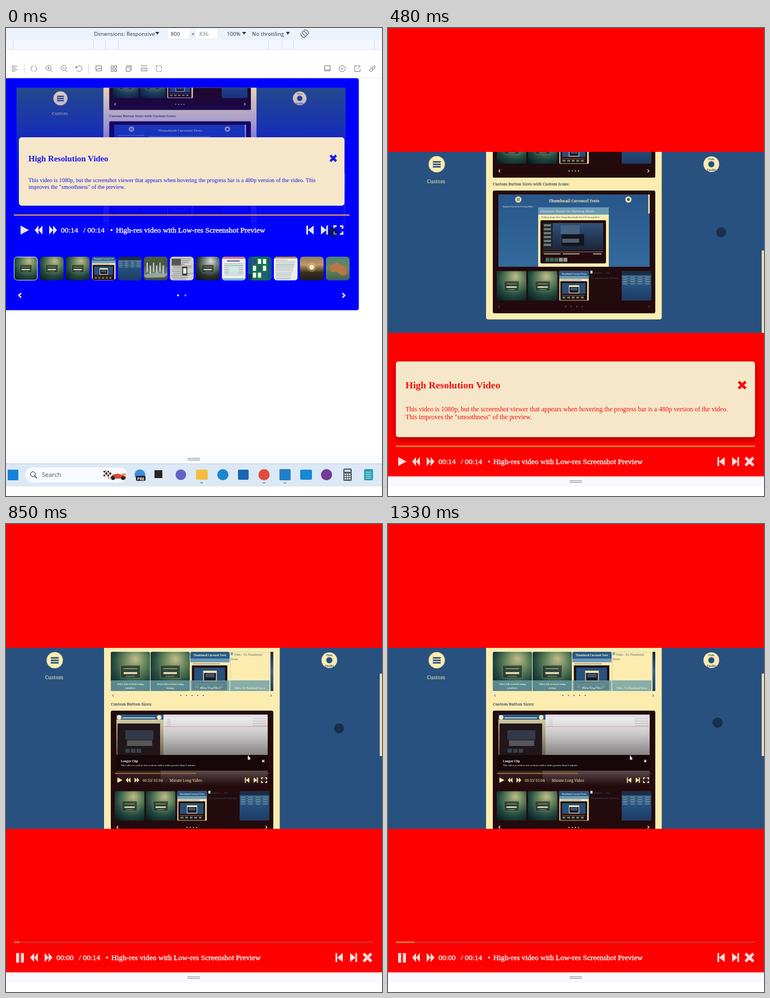
These frames come from a looping animation (671 px wide and 835 px high, 1390 ms). An HTML page with a canvas:

```html
<!DOCTYPE html>
<html lang="en">
<head>
<meta charset="utf-8">
<title>Video carousel</title>
<style>
html, body { margin: 0; width: 100%; height: 100%; overflow: hidden; background: #fff }
canvas { display: block }
</style>
</head>
<body>
<canvas id="stage" width="671" height="835"></canvas>
<script>
const g = document.getElementById('stage').getContext('2d');
const LOOP = 1390;
const SERIF = '"Liberation Serif", "Times New Roman", serif';
const SLAB = '"Noto Serif", serif';
const SANS = '"Open Sans", sans-serif';
const CREAM = '#fdecb0', NAVY = '#275080', DARK = '#230a0c';

// --- helpers ---
function rect(x, y, w, h, fill, r = 0) {
  g.fillStyle = fill;
  g.beginPath();
  g.roundRect(x, y, w, h, r);
  g.fill();
}
function frame(x, y, w, h, color, r = 0, width = 1) {
  g.strokeStyle = color;
  g.lineWidth = width;
  g.beginPath();
  g.roundRect(x, y, w, h, r);
  g.stroke();
}
function disc(x, y, r, fill) {
  g.fillStyle = fill;
  g.beginPath();
  g.arc(x, y, r, 0, 7);
  g.fill();
}
function ring(x, y, r, color, from = 0, to = 7) {
  g.strokeStyle = color;
  g.lineWidth = 1;
  g.beginPath();
  g.arc(x, y, r, from, to);
  g.stroke();
}
function poly(fill, ...p) {
  g.fillStyle = fill;
  g.beginPath();
  for (let i = 0; i < p.length; i += 2) g.lineTo(p[i], p[i + 1]);
  g.fill();
}
function line(color, width, ...p) {
  g.strokeStyle = color;
  g.lineWidth = width;
  g.beginPath();
  for (let i = 0; i < p.length; i += 2) g.lineTo(p[i], p[i + 1]);
  g.stroke();
}
function text(s, x, y, font, fill, align = 'left') {
  g.font = font;
  g.fillStyle = fill;
  g.textAlign = align;
  g.fillText(s, x, y);
}
function fade(y0, y1, ...colors) {
  const f = g.createLinearGradient(0, y0, 0, y1);
  colors.forEach((c, i) => f.addColorStop(i / (colors.length - 1), c));
  return f;
}
function place(x, y, scale, draw) {
  g.save();
  g.translate(x, y);
  g.scale(scale, scale);
  draw();
  g.restore();
}
// Clipped square tile, drawn in units of 52.
function tile(x, y, size, r, draw) {
  place(x, y, size / 52, () => {
    g.beginPath();
    g.roundRect(0, 0, 52, 52, r);
    g.clip();
    draw();
  });
}
const chevron = (x, y, dir, s, color, w) =>
  line(color, w, x - dir * s / 2, y - s, x + dir * s / 2, y, x - dir * s / 2, y + s);
const cross = (x, y, s, color, w) => {
  line(color, w, x - s, y - s, x + s, y + s);
  line(color, w, x + s, y - s, x - s, y + s);
};
const dots = (xs, y, r, color) => xs.forEach(x => disc(x, y, r, color));

// --- thumbnails ---
function nebula(gray) {
  const f = g.createRadialGradient(33, 9, 1, 30, 18, 42);
  const shades = gray === true ? ['#d4d8d0', '#78857f', '#26302e', '#0c1212']
                               : ['#bcb885', '#66855c', '#21483f', '#0a1c20'];
  shades.forEach((c, i) => f.addColorStop(i / 3, c));
  rect(0, 0, 52, 52, f);
  rect(13, 18, 26, 17, '#26362ecc', 1);
  frame(13, 18, 26, 17, '#7c8c6c', 1, .6);
  rect(17, 22, 18, 1, '#98a488');
  rect(17, 27, 18, 2.5, '#e4e0bc');
  rect(20, 32, 12, 1, '#7c8870');
}
function page() {
  rect(0, 0, 52, 52, CREAM);
  rect(0, 0, 52, 9, '#28588c');
  text('Thumbnail Carousel Tests', 26, 6, 'bold 3.3px ' + SLAB, CREAM, 'center');
  rect(0, 9, 52, 5, '#6b9bb8');
  rect(3, 15.5, 36, 1, '#8b9088');
  rect(2, 18, 47, 33, DARK);
  rect(5, 21, 41, 19, '#28507c');
  rect(17, 25, 18, 14, CREAM);
  rect(18, 28, 16, 10, '#1c1820');
  rect(20, 29, 12, 5, '#3b546e');
  rect(5, 42.5, 40, .7, '#d58a58');
  for (let i = 0; i < 5; i++) rect(6 + i * 8, 45, 5, 3, '#6a8878');
}
function table() {
  rect(0, 0, 52, 52, fade(0, 52, '#2c5784', '#254f7d', '#1d3b63'));
  rect(0, 0, 52, 7, '#1c2c44');
  for (let i = 0; i < 4; i++) {
    rect(1, 9 + i * 4, 50, .7, '#6d93ad');
    for (let j = 0; j < 4; j++) rect(2 + j * 13, 10.5 + i * 4, 8, 1, '#8aa48e');
  }
}
function falls() {
  rect(0, 0, 52, 52, fade(0, 52, '#4a5f3c', '#4b5444', '#6f7c74', '#38443c'));
  for (let i = 0; i < 6; i++) rect(6 + i * 7, 13 + i % 2 * 6, 2.5, 20, '#d6dcd8');
  poly('#98a5a0', 0, 40, 28, 34, 52, 38, 44, 45, 5, 46);
}
function paper() {
  rect(0, 0, 52, 52, '#d2d2cc');
  for (let i = 0; i < 12; i++) rect(3 + i % 3 * 2, 4 + i * 4, 44 - i % 4 * 5, 1.2, '#777');
  rect(4, 5, 20, 14, '#555');
  rect(27, 22, 11, 19, '#333');
  rect(29, 25, 7, 12, '#eee');
}
function form() {
  rect(0, 0, 52, 52, '#eef0ee');
  rect(0, 0, 52, 5, '#d9788c');
  rect(11, 8, 28, 3, '#557a94');
  for (let i = 0; i < 7; i++) rect(5, 15 + i * 4, 42, 1.4, i % 2 ? '#6aa6b4' : '#a0a8a8');
  rect(15, 22, 22, 14, '#cfe6e4');
  rect(0, 47, 52, 5, '#7ebdc5');
}
function cards() {
  rect(0, 0, 52, 52, '#14508c');
  rect(9, 0, 35, 52, '#117448');
  for (let i = 0; i < 9; i++) rect(11 + i % 3 * 11, 5 + (i / 3 | 0) * 15, 7, 11, i % 4 ? '#f4f4f0' : '#344a8c');
  rect(0, 38, 9, 14, '#0c3360');
}
function notes() {
  rect(0, 0, 52, 52, '#ecefeb');
  rect(0, 0, 52, 4, '#b88d50');
  for (let i = 0; i < 13; i++) rect(4, 7 + i * 3.4, 26 + i * 17 % 18, 1, i % 3 ? '#9aa5a8' : '#6d98b0');
}
function sunset() {
  rect(0, 0, 52, 52, fade(0, 52, '#8f7d62', '#c39a66', '#37301f', '#1d1c16'));
  disc(26, 23, 10, '#e9c98955');
  disc(26, 23, 5, '#fff3d0');
}
function wildlife() {
  rect(0, 0, 52, 52, fade(0, 52, '#4e8178', '#6c8a5c', '#396154'));
  poly('#b97745', 8, 20, 24, 13, 43, 24, 46, 38, 36, 42, 22, 32, 12, 34);
}
function broken(x, y, color) {
  rect(x, y, 4, 5, '#cdd9d5');
  const font = '6.1px ' + SLAB;
  text('Video - No', x + 6, y + 6, font, color);
  text('Thumbnail Given', x, y + 15, font, color);
}

// --- player controls ---
function corners(x, y, color) {
  for (const i of [-1, 1]) for (const j of [-1, 1])
    line(color, 3, x + i * 3, y + j * 7, x + i * 7.5, y + j * 7, x + i * 7.5, y + j * 2.5);
}
function buttons(dx, dr, y, playing, full, color) {
  const x = 18 + dx, a = y - 8, b = y + 8;
  if (playing) {
    rect(x, a, 5.5, 17, color);
    rect(x + 8.5, a, 5.5, 17, color);
  } else poly(color, x, a, x + 15, y, x, b);
  for (const k of [0, 7]) {
    poly(color, 43 + dx + k, y, 50 + dx + k, a, 50 + dx + k, b);
    poly(color, 76 + dx - k, a, 83 + dx - k, y, 76 + dx - k, b);
  }
  rect(588 + dr, a, 3, 16, color);
  poly(color, 601 + dr, a, 601 + dr, b, 591 + dr, y);
  rect(623.5 + dr, a, 3, 16, color);
  poly(color, 614 + dr, a, 614 + dr, b, 624 + dr, y);
  if (full) cross(645 + dr, y, 7, color, 5);
  else corners(645 + dr, y, color);
}
function controls(dx, dr, y, playing, full, color) {
  buttons(dx, dr, y, playing, full, color);
  g.strokeStyle = '#fff';
  g.lineWidth = .35;
  const put = (s, x) => {
    text(s, x + dx, y + 4.5, '13.5px ' + SERIF, '#fff');
    g.strokeText(s, x + dx, y + 4.5);
  };
  put(playing ? '00:00' : '00:14', 90);
  put('/ 00:14', 130);
  put('•', 178);
  put('High-res video with Low-res Screenshot Preview', 188);
}
// Title, body lines and close button, at the given text sizes and offsets.
function infoBox(x, y, w, h, color, o) {
  rect(x, y, w, h, '#f6e7ca', 5);
  text('High Resolution Video', x + 17, y + o.titleY, `bold ${o.title}px ` + SERIF, color);
  o.lines.forEach((s, i) => text(s, x + 17, y + o.bodyY + i * o.body * 1.2, o.body + 'px ' + SERIF, color));
  cross(x + w - o.inset, y + o.titleY - 5.5, o.title * .35, color, o.title * .28);
}
const INFO = 'This video is 1080p, but the screenshot viewer that appears when hovering the progress bar is a 480p version of the video.';

// --- the recorded page shown inside the video ---
function pageTop() {
  rect(-3, 221, 674, 323, '#285180');
  disc(87, 243, 14.5, CREAM);
  for (let i = 0; i < 3; i++) rect(80, 237.5 + i * 4.4, 14, 2.7, NAVY);
  text('Custom', 86, 277, '9.1px ' + SLAB, CREAM, 'center');
  disc(577, 243, 14, CREAM);
  text('View', 577, 236, 'bold 4.5px ' + SLAB, NAVY, 'center');
  disc(577, 243, 5.5, NAVY);
  text('Quolby', 577, 254.5, 'bold 4.5px ' + SLAB, NAVY, 'center');
}
function thumbRow(y) {
  tile(194, y, 53, 2, nebula);
  tile(249.5, y, 53, 2, nebula);
  tile(305.5, y, 53, 2, page);
  tile(417, y, 53, 2, table);
}
function innerScreen() {
  rect(197, 297, 270, 129, fade(297, 426, '#28568a', '#346a9c'));
  disc(232.5, 306, 5.5, CREAM);
  for (let i = 0; i < 3; i++) rect(229.5, 303.5 + i * 2, 6, 1, NAVY);
  text('Dynamic Based On Viewing Mode', 232, 320, '3.4px ' + SLAB, CREAM, 'center');
  text('Thumbnail Carousel Tests', 332, 311, 'bold 6.9px ' + SLAB, CREAM, 'center');
  disc(429, 306, 5.5, CREAM);
  disc(429, 306, 2.5, NAVY);
  rect(464.5, 297, 2.5, 34, CREAM);
  rect(268, 320, 126, 13, '#6a9ab8');
  text('Dynamic Based On Viewing Mode', 272, 329, '6px ' + SLAB, CREAM);
  rect(268, 333, 126, 93, CREAM);
  text('Profiling: Images Here Change Dynamically Based On Viewing Mode', 274, 339, '3.2px ' + SLAB, NAVY);
  rect(272, 343, 117, 77, DARK, 2);
  rect(277, 348, 107, 49, fade(348, 397, '#31527a', '#1b2338'));
  rect(277, 348, 17, 49, '#20252c');
  for (let i = 0; i < 6; i++) rect(278, 350 + i * 7, 13, 4, '#71796f');
  rect(308, 352, 34, 16, '#46627f');
  rect(310, 368, 40, 21, '#15151d');
  rect(311, 376, 30, 7, '#526070');
  rect(277, 399, 107, 1, '#a77a6a');
  rect(278, 402, 30, 2, '#aaa090');
  rect(312, 402, 30, 2, '#aaa090');
  rect(366, 402, 15, 2, '#aaa090');
  for (let i = 0; i < 5; i++) rect(281 + i * 8, 410, 7, 7, i < 3 ? '#42645a' : '#8a9490');
}
function endScene() {
  pageTop();
  rect(175, 221, 313.5, 299, CREAM, [0, 0, 4, 4]);
  g.save();
  g.beginPath();
  g.rect(175, 221, 314, 46);
  g.clip();
  rect(187, 219, 290, 48, DARK, 2);
  thumbRow(189.5);
  g.restore();
  chevron(199, 255, -1, 2.5, CREAM, 1.3);
  chevron(464.5, 255, 1, 2.5, CREAM, 1.3);
  dots([323, 329, 334.5, 340], 255, 1, CREAM);
  text('Custom Button Sizes with Custom Icons:', 187, 281, '600 6.8px ' + SLAB, '#3d5364');
  rect(187, 290, 290, 219, DARK, 3);
  innerScreen();
  thumbRow(433.5);
  broken(361, 433, '#31445d');
  chevron(198, 497, -1, 2, '#625850', 1);
  chevron(466, 497, 1, 2, '#625850', 1);
  dots([317, 327, 337, 346.5], 497, 1, '#6b7160');
  rect(667, 397, 4, 147, '#efdfb2');
}
function caption(x, ...lines) {
  rect(x, 279, 70, 19, '#6ba0a9cc');
  lines.forEach((s, i) => text(s, x + 35, (lines.length > 1 ? 287 : 294) + i * 7, 'bold 3.8px ' + SLAB, '#fff4cc', 'center'));
}
function startScene() {
  pageTop();
  rect(175, 221, 313.5, 323, CREAM);
  tile(187, 228, 70, 2, nebula);
  tile(258, 228, 70, 2, nebula);
  tile(329, 228, 70, 2, page);
  frame(400.5, 228.5, 70, 69, '#d7d5ad', 2);
  rect(401, 229, 4, 5, '#8aa099');
  text('Video - No Thumbnail', 407, 234.5, '4.8px ' + SLAB, '#566670');
  text('Given', 400.5, 243, '4.8px ' + SLAB, '#566670');
  caption(187, 'Video Sub-sections using', 'numbers');
  caption(258, 'Video Sub-sections using', 'strings');
  caption(329, 'Minute Long Video');
  caption(400, 'Video - No Thumbnail Given');
  rect(472, 228, 5, 70, fade(228, 298, '#16283c', '#36628c', '#1d3d64'));
  chevron(191, 306, -1, 2, NAVY, 1);
  chevron(473, 306, 1, 2, NAVY, 1);
  dots([312, 322, 332, 342, 352], 306, 1, NAVY);
  text('Custom Button Sizes:', 187, 324, '600 7px ' + SLAB, '#3d5364');

  rect(187, 333, 290, 211, DARK, [3, 3, 0, 0]);
  rect(197, 340, 270, 72, fade(340, 412, '#f4f2f2', '#c8c6c6', '#858383'));
  rect(281, 340, 186, 5, '#e3dce8');
  for (let i = 0; i < 5; i++) rect(287, 348 + i * 3, 7, .6, '#aaa');
  for (let i = 0; i < 4; i++) rect(440, 347 + i * 4, 25, .7, '#b09caa');
  rect(282, 361, 184, .8, '#dc8e98');
  rect(197, 340, 84, 72, fade(340, 412, '#2b5b8c', '#253e58'));
  rect(197, 349, 84, 63, fade(349, 412, '#d0c8a0', '#6b6452'));
  disc(202, 345, 4, CREAM);
  disc(273.5, 345, 4, CREAM);
  rect(208, 345, 58, 2, '#c9d1bd');
  rect(199, 356, 76, 56, '#21161a');
  rect(213, 368, 50, 17, '#34394a');
  rect(216, 386, 45, 10, '#57565a');
  for (let i = 0; i < 3; i++) rect(213 + i * 10, 401, 8, 7, '#33434c');
  rect(197, 412, 270, 28, '#160809');
  rect(276, 440, 191, 27, fade(440, 467, '#58484a', DARK));
  rect(197, 440, 79, 27, fade(440, 467, '#342427', DARK));
  text('Longer Clip', 205, 425, 'bold 5.2px ' + SLAB, '#fff');
  text('This video is used to test sections with a video greater than 1 minute.', 205, 431.5, '4.1px ' + SLAB, '#fff');
  cross(459, 423, 2, '#fff3d8', 1.5);
  rect(431.8, 413, 1.5, 5, '#fff', 1);
  rect(431.5, 416, 4.5, 4.5, '#fff', 1.5);
  rect(194, 444.2, 276, 1.2, '#64443e');
  rect(194, 444.2, 145, 1.2, '#d8793f');
  place(188, 457, .6, () => buttons(0, -190.7, 0, false, false, CREAM));
  text('00:33/ 01:04', 244, 459.5, '6.4px ' + SLAB, CREAM);
  text('·', 285, 459.5, '6.4px ' + SLAB, CREAM);
  text('Minute Long Video', 292, 459.5, '6.4px ' + SLAB, CREAM);
  thumbRow(476.5);
  broken(361, 476, '#31445d');
  chevron(199, 541, -1, 2.5, CREAM, 1.3);
  chevron(464.5, 541, 1, 2.5, CREAM, 1.3);
  dots([323, 329, 334.5, 340], 541.5, 1, CREAM);
  rect(667, 267, 4, 147, '#efdfb2');
}

// --- browser window ---
function browserBar() {
  rect(0, 0, 671, 22, '#ebf2fb');
  rect(0, 22, 671, 16, '#f4f8fe');
  rect(0, 38, 671, 1, '#d9e6f8');
  for (const x of [12, 156, 177, 200, 468, 492, 513, 657]) rect(x, 22, 1, 16, '#c6dbf4');
  rect(289, 2, 38, 17, '#fff', 2);
  rect(339, 2, 38, 17, '#fff', 2);
  const put = (s, x, c = '#303236') => text(s, x, 14, '9.6px ' + SANS, c);
  put('Dimensions: Responsive', 157);
  put('800', 294);
  put('×', 331);
  put('836', 345, '#777');
  put('100%', 394);
  put('No throttling', 439);
  for (const x of [270, 425, 503]) poly('#333', x - 3.5, 7, x + 3.5, 7, x, 12);
  place(533, 10, 1, () => {
    g.rotate(-.7);
    frame(-2.5, -5, 5, 10, '#444', 1);
    ring(0, 0, 7, '#444', -1, .8);
    ring(0, 0, 7, '#444', 2.1, 3.9);
  });
}
function toolIcons() {
  const c = '#777';
  [0, 3, 6, 9].forEach((d, i) => rect(10, 67.5 + d, [10, 7, 11, 7][i], 1, c));
  rect(32, 64, 1, 17, '#c5d7e4');
  rect(147, 64, 1, 17, '#c5d7e4');
  ring(49.5, 72.5, 5, c, -1.2, 1.4);
  ring(49.5, 72.5, 5, c, 2, 4.5);
  for (const x of [76, 103]) {
    ring(x, 71.5, 4.5, c);
    line(c, 1, x + 3, 75, x + 6.5, 78.5);
    rect(x - 2, 71, 4, 1, c);
  }
  rect(75.5, 69.5, 1, 4, c);
  ring(130.5, 72.5, 5, c, -2.6, 2.6);
  poly(c, 124, 68, 128, 71, 124, 72);
  frame(160.5, 67.5, 10, 9, c);
  line(c, 1, 161, 75, 164, 72, 166, 74, 168, 71, 170, 74);
  for (const x of [187.5, 193.5]) for (const y of [67.5, 73.5]) frame(x, y, 4, 4, c);
  frame(214.5, 69.5, 7, 8, c);
  line(c, 1, 215, 67.5, 224, 67.5, 224, 76);
  line(c, 1, 241, 67.5, 252, 67.5);
  frame(241.5, 71.5, 10, 5, c);
  g.setLineDash([3, 2]);
  frame(268.5, 67.5, 9, 10, c);
  g.setLineDash([]);
  frame(568.5, 67.5, 10, 9, c);
  line(c, 1, 569, 74.5, 578, 74.5);
  ring(600, 72.5, 5.5, c);
  cross(600, 72.5, 2, c, 1);
  line(c, 1, 627, 67.5, 622.5, 67.5, 622.5, 77.5, 632, 77.5, 632, 73);
  line(c, 1, 627, 73, 632, 67.5, 628, 67.5);
  place(654, 72.5, 1, () => {
    g.rotate(-.78);
    frame(-6, -2, 6, 4, c, 2);
    frame(0, -2, 6, 4, c, 2);
  });
}
function handle(y) {
  rect(324, y, 22, 1.5, '#aaa6b2');
  rect(324, y + 3, 22, 1.5, '#aaa6b2');
}
function taskbar(active) {
  rect(0, 762, 671, 15, '#f9fbff');
  handle(767);
  rect(0, 777, 671, 41, '#dce8f5');
  rect(0, 777, 671, 1, '#c4d0de');
  rect(3, 788, 19, 19, '#1683d8');
  rect(34, 784, 183, 27, '#f7faff', 13.5);
  ring(48, 796, 4.3, '#222');
  line('#222', 1.5, 51, 799, 55, 803);
  text('Search', 64, 801, '11px ' + SANS, '#555');
  for (let i = 0; i < 8; i++) rect(174 + i % 4 * 3.5, 790 + (i + (i / 4 | 0)) % 2 * 4 + (i / 4 | 0) * 3, 3, 3, '#2a2a34');
  line('#845', 1, 178, 789, 184, 805);
  poly('#d64b36', 186, 802, 190, 797, 200, 795, 214, 800, 214, 804, 186, 804);
  rect(207, 795, 7, 3, '#e88a3c');
  disc(191, 803, 3.5, '#26262e');
  disc(209, 803, 3.5, '#26262e');
  if (active) rect(445, 781, 31, 32, '#f5f8fd', 4);
  disc(239, 797, 9.5, '#3b8bdc');
  rect(232, 799, 17, 9, '#222', 2);
  text('PRE', 240.5, 806.5, 'bold 7px ' + SANS, '#fff', 'center');
  rect(270, 793, 15, 14, '#e8e8e8');
  rect(265, 789, 14, 14, '#24262a');
  disc(312, 797, 9.5, '#6263c4');
  rect(339, 788, 21, 18, '#f3bd43', 2);
  disc(387, 797, 10, '#1b86cf');
  rect(414, 788, 19, 18, '#1866b4', 2);
  disc(460.5, 797, 10, '#e14b3a');
  rect(488, 787, 20, 20, '#1f80ca', 2);
  rect(525, 788, 21, 18, '#1787d3', 2);
  disc(572, 797, 10, '#713a94');
  rect(602, 786, 15, 22, '#4d5661', 2);
  rect(604, 788, 11, 4, '#b9d8ea');
  for (let i = 0; i < 9; i++) rect(604 + i % 3 * 4, 795 + (i / 3 | 0) * 4, 3, 2.5, '#e2e6e8');
  rect(639, 787, 16, 20, '#2ba0b4', 2);
  for (let i = 0; i < 4; i++) rect(642, 792 + i * 3.5, 10, 1, '#d3f0f2');
  for (const x of [349, 460.5, 498]) rect(x - 2.5, 810.5, 5, 2, active && x == 460.5 ? '#2a72bf' : '#858d96', 1);
}
const carousel = [nebula, nebula, nebula, page, table, falls, paper,
  () => nebula(true), form, cards, notes, sunset, wildlife];

function browserView(active) {
  browserBar();
  toolIcons();
  g.setLineDash([1, 2]);
  line('#a9c8e0', 1, 630, 89.5, 671, 89.5);
  g.setLineDash([]);
  rect(0, 89.5, 629.6, 414, '#00f', [0, 4, 4, 0]);
  place(21.3, 106.4, .8715, () => {
    g.translate(0, -221);
    endScene();
  });
  rect(18, 106, 590, 284, fade(106, 384, '#0000ff1c', '#0000ff60', '#0000ffb8', '#0000ffe4', '#00f'));
  infoBox(23, 195, 581, 122, '#1616ee', {
    title: 14.8, titleY: 43, body: 10.08, bodyY: 79.5, inset: 20,
    lines: [INFO + ' This', 'improves the "smoothness" of the preview.']
  });
  rect(14, 332.5, 599, 2.5, '#cf8a66');
  controls(8, -52, 360.5, false, false, '#e6e6ff');
  carousel.forEach((draw, i) => tile(14 + i * 46.4, 408, 42.5, 7, draw));
  frame(14.5, 408.5, 41.5, 41.5, '#d8e0e8', 6);
  chevron(25, 477, -1, 4, '#fff', 2.4);
  chevron(602.5, 477, 1, 4, '#fff', 2.4);
  disc(307, 477, 1.8, '#fff');
  disc(320, 477, 1.8, '#8c8cff');
  taskbar(active);
}
function fullView(playing, progress) {
  rect(0, 0, 671, 800, '#f00');
  if (playing) startScene();
  else {
    endScene();
    g.save();
    g.shadowColor = '#0006';
    g.shadowBlur = 12;
    g.shadowOffsetY = 4;
    rect(14, 595, 641, 135, '#f6e7ca', 5);
    g.restore();
    infoBox(14, 595, 641, 135, '#f50f0f', {
      title: 17.6, titleY: 47.7, body: 11.79, bodyY: 89, inset: 23,
      lines: [INFO, 'This improves the "smoothness" of the preview.']
    });
  }
  rect(14, 745, 641, 2.5, '#c8322a');
  rect(14, 745, progress, 2.5, '#e08a48');
  controls(0, 0, 773.5, playing, true, '#ffdede');
  rect(0, 800, 671, 18, '#f9f9ff');
  handle(807);
}

function cursor(t) {
  const k = Math.min(1, Math.max(0, (t - 910) / 120));
  const x = t < 60 ? 583.5 : t < 130 ? 590 : 594.5 - 6.5 * k;
  disc(x, 364.5 - 10 * k, 9, '#0a1a2899');
}
function draw(now) {
  const t = now % LOOP;
  g.fillStyle = '#fff';
  g.fillRect(0, 0, 671, 835);
  if (t < 480) browserView(t >= 340);
  else if (t < 550) fullView(false, 641);
  else fullView(true, t < 850 ? 0 : t < 1090 ? 10 : t < 1330 ? 21 : 33);
  cursor(t);
  requestAnimationFrame(draw);
}
draw(performance.now());
</script>
</body>
</html>
```
